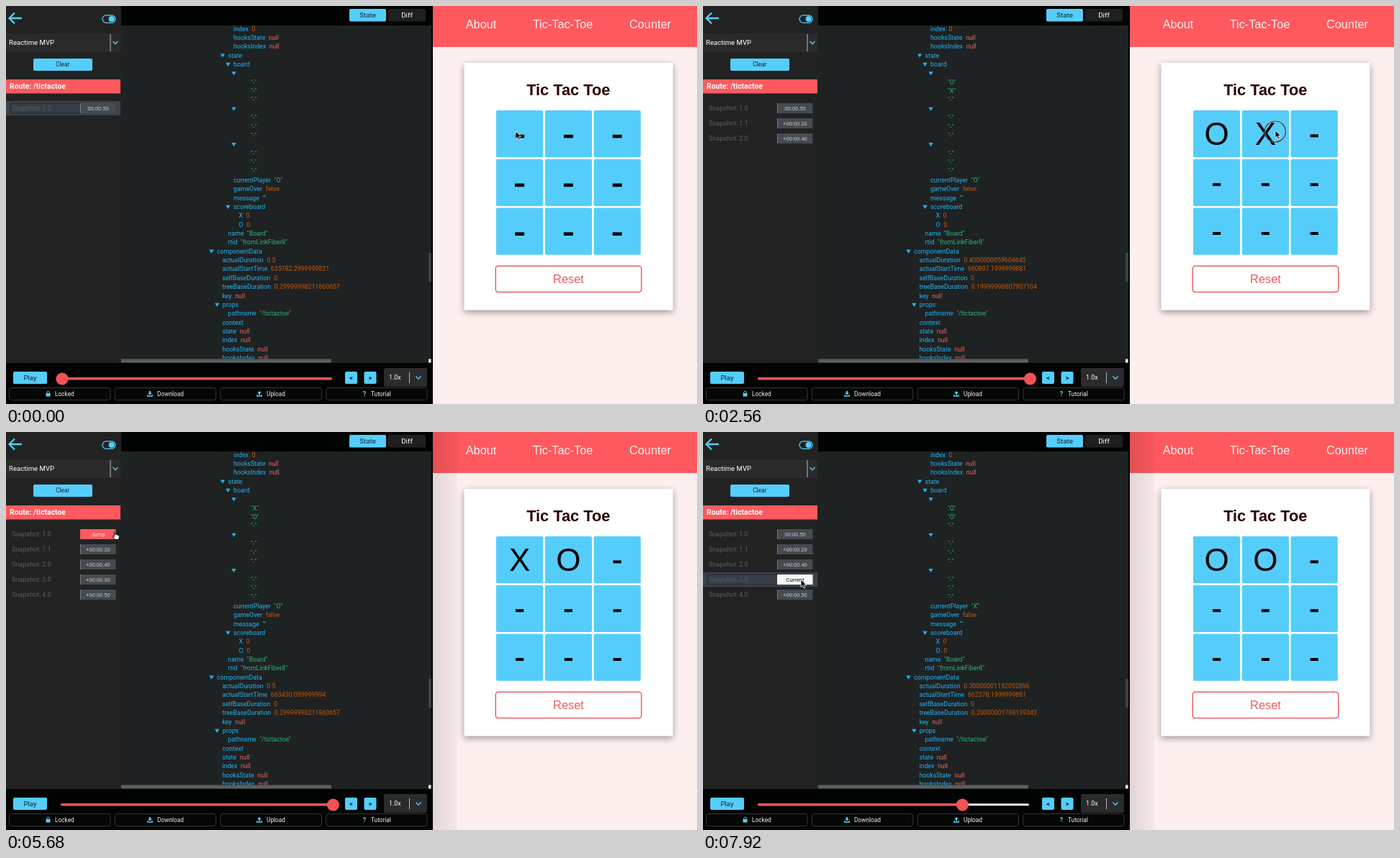
Recreate the animation shown at these times as an HTML page. Size 960x553 px, loop 8 s.

```html
<!DOCTYPE html>
<html lang="en">
<head>
<meta charset="utf-8">
<title>Time travel tic-tac-toe</title>
<style>
html, body { margin: 0; width: 100%; height: 100%; overflow: hidden; background: #000; }
svg { display: block; position: absolute; left: 0; top: 0; }
text { font-family: Roboto, sans-serif; white-space: pre; }
.app text { font-family: "Liberation Sans", Arial, sans-serif; }
.mid { text-anchor: middle; }
.card { filter: drop-shadow(0 3px 5px rgba(0,0,0,.38)); }
</style>
</head>
<body>
<svg id="stage" width="960" height="553" viewBox="0 0 960 553">
  <defs>
    <clipPath id="treeClip"><rect x="160" y="27" width="430" height="463.5"/></clipPath>
    <linearGradient id="shade">
      <stop offset="0" stop-color="#000" stop-opacity=".11"/>
      <stop offset="1" stop-color="#000" stop-opacity=".03"/>
    </linearGradient>
  </defs>
</svg>
<script>
const LOOP = 8000, STEP = 80;
const BLUE = '#55cdfb', RED = '#fe595e', KEY = '#23b3f2', NUM = '#c15a10', STR = '#30b47c', NUL = '#ef635f';
const stage = document.getElementById('stage');

function el(parent, tag, attrs = {}, content) {
  const node = document.createElementNS('http://www.w3.org/2000/svg', tag);
  for (const k in attrs) node.setAttribute(k, attrs[k]);
  if (content !== undefined) node.textContent = content;
  parent.appendChild(node);
  return node;
}
const set = (node, attrs) => { for (const k in attrs) node.setAttribute(k, attrs[k]); };
const show = (node, on) => { node.style.display = on ? '' : 'none'; };
const box = (p, x, y, width, height, fill, more) => el(p, 'rect', { x, y, width, height, fill, ...more });
const label = (p, x, y, size, fill, s, more) => el(p, 'text', { x, y, 'font-size': size, fill, ...more }, s);
const line = (p, d, stroke, width, more) => el(p, 'path', { d, stroke, 'stroke-width': width, fill: 'none', ...more });
const MID = { class: 'mid' };

const states = [
  { board: '--', player: 'O', dur: '0.5', start: '635782.2999999821', base: '0.29999998211860657', name: '1.0', time: '00:00.50' },
  { board: 'O-', player: 'X', dur: '0.19999998807907104', start: '659447.099999994', base: '0.19999998807907104', name: '1.1', time: '+00:00.20' },
  { board: 'OX', player: 'O', dur: '0.4000000059604645', start: '660897.1999999881', base: '0.19999998807907104', name: '2.0', time: '+00:00.40' },
  { board: 'OO', player: 'X', dur: '0.30000001192092896', start: '662378.1999999881', base: '0.20000001788139343', name: '3.0', time: '+00:00.30' },
  { board: 'XO', player: 'O', dur: '0.5', start: '663430.099999994', base: '0.29999998211860657', name: '4.0', time: '+00:00.50' }
];

// [time, state shown, snapshots recorded]
const steps = [
  [0, 0, 1], [160, 1, 2], [1200, 2, 3], [2640, 3, 4], [3680, 4, 5],
  [6080, 0, 5], [6640, 1, 5], [7120, 2, 5], [7680, 3, 5]
];
const clicks = [80, 1120, 2560, 3600, 4960, 6000, 6560, 7040, 7600];
const path = [
  [0, 708, 174], [240, 708, 174], [960, 748, 195], [1120, 779, 186], [1360, 782, 184],
  [2400, 795, 173], [2720, 795, 173], [3520, 726, 177], [4000, 726, 177], [4800, 249, 113],
  [5120, 249, 113], [5840, 137, 142], [6160, 137, 142], [6400, 137, 164], [6720, 137, 164],
  [6960, 137, 184], [7200, 137, 184], [7520, 136, 205], [8000, 136, 205]
];

// ---- web page on the right ----
const app = el(stage, 'g', { class: 'app' });
box(app, 593, 0, 367, 553, '#feefef');
box(app, 593, 0, 367, 57, RED);
const shade = box(app, 593, 0, 18, 553, 'url(#shade)');
[['About', 660], ['Tic-Tac-Toe', 773.5], ['Counter', 895]].forEach(([s, x]) =>
  label(app, x, 31.3, 16.3, '#fff3f3', s, MID));
box(app, 636.5, 79, 290, 343.5, '#fff', { class: 'card', rx: 1 });
label(app, 781.3, 124, 21.8, '#2c0303', 'Tic Tac Toe', { class: 'mid', 'font-weight': 700 });
const cells = [];
for (let i = 0; i < 9; i++) {
  const x = 681 + i % 3 * 67.8, y = 145 + Math.floor(i / 3) * 67.8;
  box(app, x, y, 65.2, 65.2, BLUE, { rx: 2 });
  cells.push({
    x, y,
    mark: label(app, x + 32.6, y + 48.2, 44, '#000', '', MID),
    dash: box(app, 0, 0, 0, 0, '#000')
  });
}
box(app, 680.3, 361.2, 202.4, 36.4, '#fff', { rx: 3.5, stroke: '#ec5e63', 'stroke-width': 1.5 });
label(app, 781.5, 385.2, 16.4, '#ec5a5f', 'Reset', MID);

// ---- side panel ----
const tool = el(stage, 'g');
box(tool, 0, 0, 593, 553, '#020303');
box(tool, 0, 0, 160, 496, '#222');
box(tool, 160, 27, 431, 469, '#1e2223');
line(tool, 'M22 17H5M12 9.5L4.5 17L12 24.5', BLUE, 2.3);
box(tool, 134, 12.8, 18, 10.6, '#222', { rx: 5.3, stroke: BLUE, 'stroke-width': 1.3 });
el(tool, 'circle', { cx: 146.6, cy: 18.1, r: 4, fill: BLUE });
box(tool, 0, 38, 159, 26, '#2a2a2a');
label(tool, 4, 54.2, 9.6, '#fff', 'Reactime MVP');
line(tool, 'M145 39V63', '#b9b9b9', 1);
const chevron = (x, y) => line(tool, `M${x - 3.5} ${y - 2}l3.5 3.7l3.5 -3.7`, BLUE, 1.4);
chevron(152, 51);
box(tool, 38, 73, 82, 17, BLUE, { rx: 2 });
label(tool, 78.8, 84.4, 8.4, '#17252b', 'Clear', MID);
box(tool, 0, 102, 159, 19.5, RED);
label(tool, 5, 115.4, 10.4, '#fff', 'Route: /tictactoe', { 'font-weight': 700 });

const rows = states.map((s, i) => {
  const g = el(tool, 'g'), y = 142 + i * 21;
  const glow = box(g, 0, y - 10, 159, 20, '#3b434b');
  const field = box(g, 6, y - 7, 98, 14, '#363d44', { stroke: '#24292d' });
  label(g, 8, y + 3.2, 9, '#5b5f63', 'Snapshot: ' + s.name);
  const button = box(g, 103, y - 7, 49.5, 14, '#454b51');
  const edge = box(g, 103, y - 7, 1, 14, '#767c82');
  const text = label(g, 128, y + 2.8, 7.6, '#c9cbcd', s.time, MID);
  return { g, y, glow, field, button, edge, text };
});

// ---- state tree ----
const tree = el(tool, 'g', { 'clip-path': 'url(#treeClip)' });
const dyn = {};
let rowNo = 0;
function item(x, key, value, color, id, open) {
  const y = 31.5 + 12.37 * rowNo++;
  if (open) el(tree, 'path', { d: `M${x - 10.7} ${y - 2.2}h6.4l-3.2 5.2z`, fill: KEY });
  const t = label(tree, x, y + 3, 8.8, KEY, key);
  if (value === undefined) return;
  const v = el(t, 'tspan', { fill: color, dx: key ? 4.6 : 0 }, value);
  if (id) dyn[id] = v;
}
const branch = (x, key) => item(x, key, undefined, '', '', true);
const nulls = (x, ...keys) => keys.forEach(k => item(x, k, 'null', NUL));

item(316, 'index', '0', NUM);
nulls(316, 'hooksState', 'hooksIndex');
branch(308.5, 'state');
branch(316, 'board');
for (let r = 0; r < 3; r++) {
  branch(324, '');
  for (let c = 0; c < 3; c++) item(340, '', '"-"', STR, 'cell' + (r * 3 + c));
}
item(316, 'currentPlayer', '', STR, 'player');
item(316, 'gameOver', 'false', NUM);
item(316, 'message', '""', STR);
branch(316, 'scoreboard');
item(323.5, 'X', '0', NUM);
item(323.5, 'O', '0', NUM);
item(308.3, 'name', '"Board"', STR);
item(308.3, 'rtid', '"fromLinkFiber8"', STR);
branch(293, 'componentData');
item(300.4, 'actualDuration', '', NUM, 'dur');
item(300.4, 'actualStartTime', '', NUM, 'start');
item(300.4, 'selfBaseDuration', '0', NUM);
item(300.4, 'treeBaseDuration', '', NUM, 'base');
nulls(300.4, 'key');
branch(300.8, 'props');
item(308.3, 'pathname', '"/tictactoe"', STR);
item(300.4, 'context');
nulls(300.4, 'state', 'index', 'hooksState', 'hooksIndex');

box(tool, 160, 490.5, 292, 5, '#5b5d5e');
box(tool, 587, 490.5, 3.5, 5, '#f2f2f2');
box(tool, 587, 343, 4, 40, '#3f4243');
box(tool, 477, 4, 51, 17.5, BLUE, { rx: 2 });
label(tool, 502.6, 16.4, 9.8, '#14242b', 'State', MID);
box(tool, 531, 4, 52, 17.5, '#1f1f1f', { rx: 2 });
label(tool, 557, 16.4, 9.8, '#fff', 'Diff', MID);

// ---- bottom controls ----
box(tool, 10, 508, 47, 17, BLUE, { rx: 2 });
label(tool, 33.5, 519.8, 9.6, '#14242b', 'Play', MID);
box(tool, 76, 516.3, 377, 3, '#e9e9e9', { rx: 1.5 });
const fill = box(tool, 76, 516.3, 377, 3, '#ee4f55', { rx: 1.5 });
const knob = el(tool, 'circle', { cy: 518, r: 8.6, fill: '#f25257' });
[['<', 471], ['>', 497.5]].forEach(([s, x]) => {
  box(tool, x, 508, 17, 17, BLUE, { rx: 2 });
  label(tool, x + 8.5, 519.6, 9, '#111', s, { class: 'mid', 'font-weight': 700 });
});
box(tool, 525, 503, 60, 26, '#2b2b2b', { rx: 2 });
label(tool, 532, 519.4, 8.8, '#fff', '1.0x');
line(tool, 'M560.5 509V524', '#b9b9b9', 1);
chevron(573, 516.5);
[['Locked', 4.5, 68], ['Download', 151.2, 210], ['Upload', 298, 362], ['Tutorial', 444.7, 507]].forEach(([s, x, tx]) => {
  box(tool, x, 530.5, 140.5, 17, '#050606', { rx: 3, stroke: '#363636' });
  label(tool, tx, 541.8, 8.3, '#f4f4f4', s);
});
box(tool, 55.5, 538, 6, 4.5, BLUE, { rx: .6 });
line(tool, 'M56.8 538.3V536.8a1.7 1.7 0 0 1 3.4 0V538.3', BLUE, 1);
const tray = x => line(tool, `M${x - 3.2} 540v2h6.4v-2`, BLUE, 1.4);
tray(200);
el(tool, 'path', { d: 'M199 535h2v2.5h2l-3 3l-3 -3h2z', fill: BLUE });
tray(352);
el(tool, 'path', { d: 'M351 540.5h2v-2.5h2l-3 -3l-3 3h2z', fill: BLUE });
label(tool, 498, 542, 9, BLUE, '?', { class: 'mid', 'font-weight': 700 });

// ---- pointer ----
const ring = el(stage, 'g');
el(ring, 'circle', { cy: 1.5, r: 14.5, fill: 'none', stroke: '#fff', 'stroke-opacity': .45, 'stroke-width': 2.4 });
el(ring, 'circle', { cy: 1.5, r: 14.5, fill: 'none', stroke: '#222', 'stroke-width': 1.2 });
const arrow = el(stage, 'path', {
  d: 'M0 0V10.3L2.4 8.1L4.1 12L6 11.2L4.3 7.4H7.6Z', fill: '#000', stroke: '#fff', 'stroke-width': .8
});
const hand = el(stage, 'path', {
  d: 'M-.8 1Q0 0 .9 1V4.2Q2.4 3.6 3 4.7Q4.4 4.2 4.9 5.4Q6.2 5.2 6.3 6.6Q6.3 9 5 11H.2Q-1 9 -3 7Q-2.6 5.6 -.8 7Z',
  fill: '#fff', stroke: '#111', 'stroke-width': 1
});

function pointerAt(t) {
  const i = Math.max(1, path.findIndex(p => p[0] > t));
  const [t0, x0, y0] = path[i - 1], [t1, x1, y1] = path[i];
  const u = (t - t0) / (t1 - t0), e = u * u * (3 - 2 * u);
  return [x0 + (x1 - x0) * e, y0 + (y1 - y0) * e];
}

function draw(t) {
  const [, cur, count] = steps.filter(s => s[0] <= t).pop();
  const s = states[cur], jumped = t >= 6080, empty = cur === 0;
  const [px, py] = pointerAt(t);

  cells.forEach((c, i) => {
    const m = s.board[i] || '-';
    c.mark.textContent = m === '-' ? '' : m;
    show(c.dash, m === '-');
    const w = empty ? 13 : 11.2, h = empty ? 4.6 : 4;
    set(c.dash, { x: c.x + 32.6 - w / 2, y: c.y + (empty ? 33.8 : 33.4), width: w, height: h });
    dyn['cell' + i].textContent = `"${m}"`;
  });
  dyn.player.textContent = `"${s.player}"`;
  for (const k of ['dur', 'start', 'base']) dyn[k].textContent = s[k];

  let overJump = false;
  rows.forEach((r, i) => {
    const on = i === cur && (jumped || count === 1);
    const hover = i < count && px > 103 && px < 153 && Math.abs(py - r.y) < 8;
    const now = hover && on;
    if (hover && !on) overJump = true;
    show(r.g, i < count);
    show(r.glow, on);
    show(r.field, on);
    show(r.edge, !hover);
    set(r.button, { fill: now ? '#f6f6f6' : hover ? RED : '#454b51' });
    set(r.text, { fill: now ? '#111' : hover ? '#fff' : '#c9cbcd' });
    r.text.textContent = now ? 'Current' : hover ? 'Jump' : states[i].time;
  });

  const x = count === 1 ? 78 : 78 + 376.5 * cur / (count - 1);
  set(knob, { cx: x });
  set(fill, { width: count === 1 ? 377 : Math.min(377, x - 76) });

  show(shade, t >= 4880);
  set(shade, { width: t < 5040 ? 18 : 34 });

  const move = { transform: `translate(${px} ${py})` };
  [ring, arrow, hand].forEach(n => set(n, move));
  show(ring, clicks.some(c => t >= c && t < c + 80));
  show(hand, overJump);
  show(arrow, !overJump);
}

const begin = performance.now();
function tick() {
  const t = (performance.now() - begin) % LOOP;
  draw(Math.floor(t / STEP) * STEP);
  requestAnimationFrame(tick);
}
tick();
</script>
</body>
</html>
```
